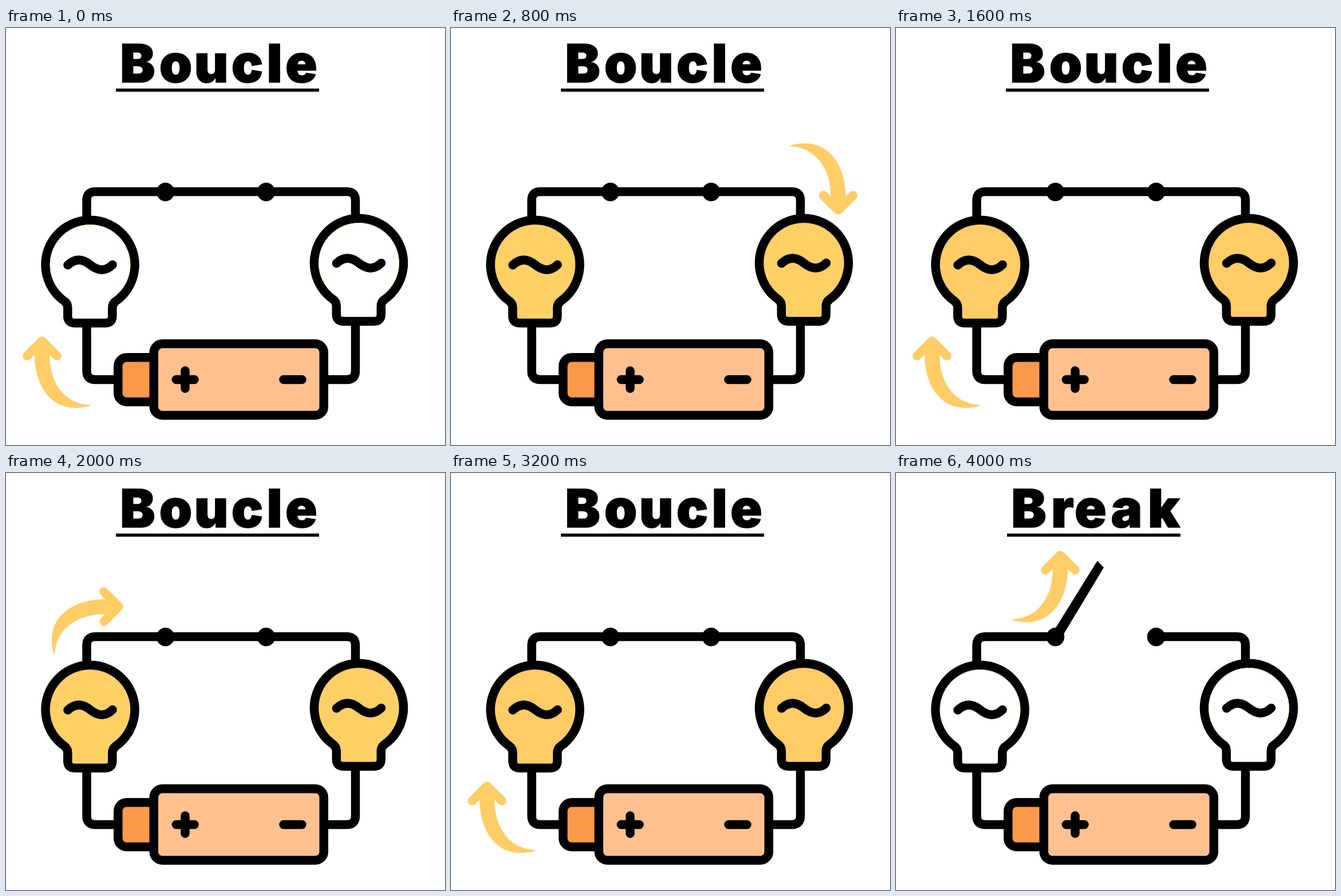
Write an HTML page that moves like this. It is 767 px wide and 730 px high and loops after 4800 ms.

```html
<!DOCTYPE html>
<html lang="fr">
<head>
<meta charset="utf-8">
<title>Boucle / Break</title>
<style>
  html, body { margin: 0; width: 100%; height: 100%; overflow: hidden; background: #fff; }
  svg { display: block; width: 100%; height: 100%; }
  .line { fill: none; stroke: #000; stroke-width: 15.5; stroke-linecap: round; stroke-linejoin: round; }
  .title { font: 900 92px "Arial Black", Inter, sans-serif; text-anchor: middle; stroke: #000; stroke-width: 1.4; }
</style>
</head>
<body>
<svg viewBox="0 0 767 730">
  <defs>
    <path id="glass" d="M102 478A78 78 0 1 1 192 478C188 481 185.800 485 185.800 490V504Q185.800 516.500 173.500 516.500H120Q107.800 516.500 107.800 504V490C107.800 485 106 481 102 478Z"/>
    <path id="rim" d="M107 472A70 70 0 1 1 187 472" fill="none" stroke="#ffe3a6" stroke-width="1"/>
    <path id="wave" d="M108 415C122 402 135 405 147 414.500S172 428 186 414.500"/>
  </defs>

  <g id="closed">
    <text class="title" x="230 296.500 358.500 421.500 469 516" y="94.500">Boucle</text>
    <rect x="192" y="106" width="355" height="5.500"/>
    <path class="line" d="M278 286.500H454"/>
  </g>
  <g id="open">
    <text class="title" x="232 291 340 403 468" y="94.500">Break</text>
    <rect x="194" y="106" width="303" height="5.500"/>
    <path d="M349 158L352 154L363 165.500L293 282L276 276Z"/>
  </g>

  <g class="line">
    <path d="M278 286.500H156Q141 286.500 141 301.500V335"/>
    <path d="M454 286.500H595.500Q610.500 286.500 610.500 301.500V332"/>
    <path d="M141 518V600.500Q141 615.500 156 615.500H194"/>
    <path d="M610.500 515V600.500Q610.500 615.500 595.500 615.500H556"/>
  </g>
  <ellipse cx="278.500" cy="287" rx="15.700" ry="16.200"/>
  <ellipse cx="454.500" cy="287" rx="15.700" ry="16.200"/>

  <g id="left" fill="#fff">
    <use href="#glass" class="fill"/>
    <use href="#glass" class="line"/>
    <use href="#rim" class="rim"/>
    <use href="#wave" class="line"/>
  </g>
  <g id="right" fill="#fff" transform="translate(469.500 -3)">
    <use href="#glass" class="fill"/>
    <use href="#glass" class="line"/>
    <use href="#rim" class="rim"/>
    <use href="#wave" class="line"/>
  </g>

  <rect class="line" x="195.800" y="576.800" width="90" height="77.700" rx="15" style="fill:#f9994a"/>
  <rect class="line" x="258.300" y="552.800" width="297" height="125.200" rx="15" style="fill:#ffc08f"/>
  <path class="line" d="M297.300 615.500H329M313 600V631M485 615.500H517"/>

  <g id="arrow" fill="#ffcc66">
    <path d="M8 34L34 8L60 34" fill="none" stroke="#ffcc66" stroke-width="15.500" stroke-linecap="round" stroke-linejoin="round"/>
    <path d="M21 32L34 17L47 32C47 80 72 118 118 120V121C111 124 102 125 92 125C45 125 21 80 21 32Z"/>
  </g>
</svg>
<script>
  const STEP = 400, STEPS = 12, BREAK = 10;
  const tour = [
    "translate(29 540)",
    "translate(205 200) rotate(90)",
    "translate(710.5 327) rotate(180)",
    "translate(576 706) rotate(-90)"
  ];
  const lift = "translate(321 136) scale(-1 1)";
  const get = id => document.getElementById(id);
  const show = (node, on) => node.setAttribute("visibility", on ? "visible" : "hidden");

  function light(id, on, color) {
    const bulb = get(id);
    bulb.setAttribute("fill", on ? color : "#fff");
    show(bulb.querySelector(".rim"), !on);
  }

  function draw(time) {
    const step = Math.floor(time / STEP) % STEPS;
    const open = step >= BREAK;
    const color = step % 4 ? "#ffd066" : "#ffcc66";
    show(get("closed"), !open);
    show(get("open"), open);
    light("left", step >= 1 && !open, color);
    light("right", step >= 2 && !open, color);
    get("arrow").setAttribute("transform", open ? lift : tour[step % 4]);
  }

  function tick() {
    draw(performance.now());
    requestAnimationFrame(tick);
  }
  tick();
</script>
</body>
</html>
```
